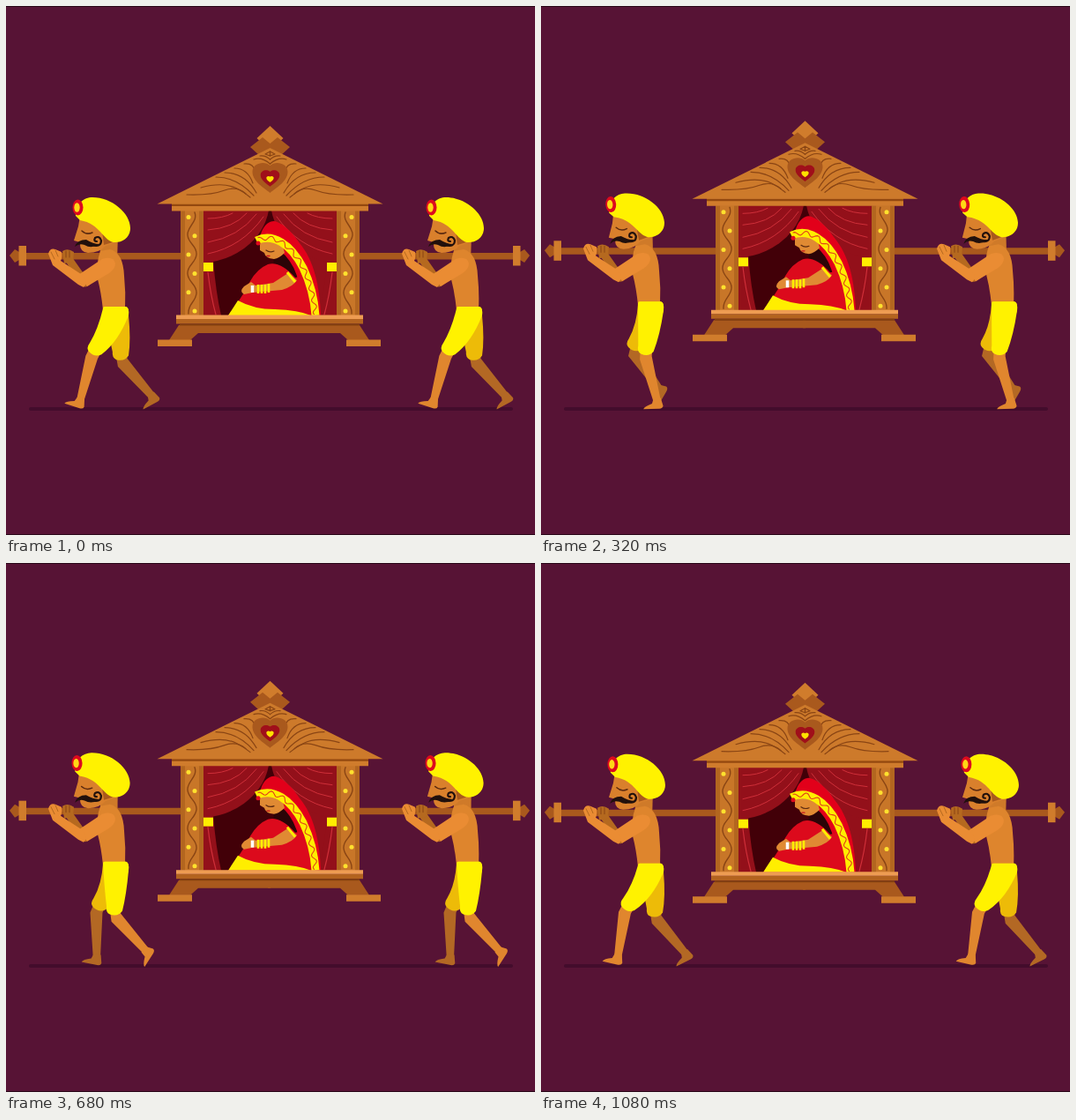
An HTML page for the animation above (1.12 s loop, 600 px wide and 600 px high).

```html
<!DOCTYPE html>
<html lang="en">
<head>
<meta charset="utf-8">
<title>Palanquin</title>
<style>
html, body { margin: 0; width: 100%; height: 100%; overflow: hidden; background: #571335; }
svg { display: block; width: 100vw; height: 100vh; }
.line { fill: none; stroke-linecap: round; stroke-linejoin: round; }
.flat { fill: none; stroke-linecap: butt; }
</style>
</head>
<body>
<svg id="stage" viewBox="0 0 600 600">
  <defs>
    <clipPath id="edge"><rect width="578" height="600"/></clipPath>

    <g id="carving" class="line" stroke="#8a4514" stroke-width="1.2">
      <path d="M205 214 Q232 215 248 209 Q262 204 272 213"/>
      <path d="M221 206 Q246 199 262 207 Q270 211 277 217"/>
      <path d="M238 194 Q262 194 281 215"/>
      <path d="M248 189 Q271 189 284 212"/>
      <path d="M259 184 Q274 184 280 201"/>
      <path d="M270 179 Q281 178 282 187"/>
      <path d="M281 174 Q290 171 299.5 179"/>
      <path d="M288 170 Q294 169 299.5 174"/>
      <path d="M294 168 L299.5 165 L299.5 170 Z"/>
    </g>

    <g id="pillar">
      <path d="M198 232 H224 V351 H198 Z" fill="#b3661f"/>
      <path d="M203 232 H219 V351 H203 Z" fill="#c87628"/>
      <path class="line" stroke="#8a4514" stroke-width="1.4"
        d="M214 234 C218 245 205 250 206 260 S217 272 216 282 S205 294 206 304 S217 316 216 326 S206 338 207 349"/>
    </g>

    <g id="curtain">
      <path d="M224 288 H235 Q238 325 244 351 H224 Z" fill="#93101a"/>
      <path class="line" stroke="#cf2f39" stroke-width="1.2" d="M229 302 Q232 328 238 350"/>
      <path d="M224 232 H298 Q293 258 270 275 Q249 290 224 291 Z" fill="#93101a"/>
      <g class="line" stroke="#cf2f39">
        <path d="M229 241 Q246 241 257 235"/>
        <path d="M229 254 Q258 252 273 235"/>
        <path d="M229 268 Q264 262 284 236"/>
        <path d="M229 281 Q268 273 292 239"/>
      </g>
      <path d="M224 291 H235 V301 H224 Z" fill="#ffee00"/>
    </g>

    <g id="foothold">
      <path d="M185 379 L196 362 H300 V371 H218 L209 379 Z" fill="#a9591d"/>
      <path d="M172 378.500 H211 V386 H172 Z" fill="#d07c2c"/>
    </g>

    <g id="poleEnd">
      <path d="M22 280 H199 V287.500 H22 Z" fill="#a9591d"/>
      <path d="M4 283 L10 276 L15 279 V288 L10 291 Z" fill="#a9591d"/>
      <path d="M14.500 272 H23 V294.500 H14.500 Z" fill="#d07c2c"/>
    </g>

    <path id="heart" d="M0 17 C-7 11 -20 4 -20 -7 C-20 -17 -6 -20 0 -14 C6 -20 20 -17 20 -7 C20 4 7 11 0 17 Z"/>

    <g id="head">
      <path d="M108 258 H127 L126 290 H106 Z" fill="#cf7a29"/>
      <path d="M84 238 L82 250 L77 266 L84 268 Q83 279 93 280 Q106 280 113 272 L125 268 L118 240 Z" fill="#d9802c"/>
      <path d="M109 255 Q116 262 121 268 L111 271 Z" fill="#a9591d"/>
      <path class="line" stroke="#5c2a10" stroke-width="1.500" d="M86 255 Q91 260 98 257"/>
      <path d="M78 273 Q81 265 91 265 Q99 270 106 270 Q97 276 89 271 Q83 269 78 273 Z" fill="#21100c"/>
      <path class="line" stroke="#21100c" stroke-width="2.200" d="M97 271 Q108 274 108 266 Q106 260 101 263 Q99 267 103 267"/>
      <path d="M79 238 C78 225 88 217 98 217 C120 217 141 235 141 252 C141 263 131 269 122 268 C109 265 107 247 84 243 Z" fill="#fff200"/>
      <ellipse cx="81.500" cy="228.500" rx="6" ry="9" fill="#dd0a1e"/>
      <ellipse cx="80.500" cy="228.500" rx="3.200" ry="5.200" fill="#ffd815"/>
    </g>

    <g id="farArm">
      <path class="line" stroke="#b5691f" stroke-width="9" d="M71 287 L90 314 L108 301"/>
      <path d="M64 278 Q70 274 77 279 L76 290 L66 292 Z" fill="#b5691f"/>
      <path class="line" stroke="#8a4514" d="M68 278 V285 M72 278 V285"/>
    </g>
    <path id="torso" d="M107 278 L118 276 Q133 280 134 306 Q136 325 135 345 H110 Q108 325 104 310 Q102 291 107 278 Z" fill="#de852d"/>
    <g id="nearArm">
      <path d="M109 287 Q122 283 124 292 Q124 298 117 303 L92 318 L82 305 Z" fill="#ea8c33"/>
      <path d="M48 281 Q50 274 56 276 L63 279 Q64 285 62 289 L85 304 Q95 312 88 319 L82 316 L53 294 Z" fill="#ea8c33"/>
      <path class="line" stroke="#b5691f" d="M51 279 L55 287 M56 277 L59 284"/>
    </g>
  </defs>

  <rect width="600" height="600" fill="#571335"/>
  <path d="M0 .5 H600 M0 599.500 H600" stroke="#2a0819"/>
  <path class="line" d="M28 457 H573" stroke="#430c2c" stroke-width="4"/>

  <g id="house">
    <use href="#poleEnd"/>
    <use href="#poleEnd" transform="matrix(-1 0 0 1 598 0)"/>
    <path d="M223 231 H376 V352 H223 Z" fill="#420008"/>
    <path d="M330 270 H376 V351 H345 Z" fill="#93101a"/>
    <use href="#curtain"/>
    <use href="#curtain" transform="matrix(-1 0 0 1 599 0)"/>

    <path d="M303 276 L328 284 L331 312 L304 298 Z" fill="#2c0407"/>
    <path d="M288 263 C290 251 297 244 304 244 C314 246 324 256 333 269 C349 288 356 318 357 351 H320 L332 314 Q324 276 286 265 Z" fill="#e2001a"/>
    <path d="M258 343 Q271 325 277 312 Q285 298 297 293 Q311 289 328 308 L346 305 V351 H252 Z" fill="#dc0a1c"/>
    <path d="M252 351 L263 334 Q281 344 305 344 Q332 345 346 351 Z" fill="#ffee00"/>
    <path d="M288 266 L304 264 Q315 271 316 280 Q310 286 304 287 Q294 286 293 280 L288 277 Z" fill="#e08a33"/>
    <path class="line" stroke="#5c2a10" stroke-width="1.200" d="M295 277 Q299 280 304 278"/>
    <path class="line" stroke="#c4141c" stroke-width="1.300" d="M296 283.500 H299"/>
    <path id="trim" class="flat" stroke="#ffee00" stroke-width="9" d="M284 266 C303 257 323 270 337 297 Q349 322 351 351"/>
    <path id="wave" class="line" stroke="#e2401a" stroke-width="1.100"/>
    <circle cx="286" cy="269" r="2.500" fill="#dd0a1e"/>
    <path d="M320 303 L330 311 Q326 318 313 322 L280 325 L270 327 Q264 324 270 318 L278 313 L283 317 L303 314 Z" fill="#e08a33"/>
    <path class="flat" stroke="#ffee00" stroke-width="3" d="M319 302 L328 313"/>
    <path class="flat" stroke="#ffee00" stroke-width="2.600" d="M286 316 V326 M290 316 V326 M294 316 V326 M298 315 V325"/>
    <path class="flat" stroke="#fff" stroke-width="3.500" d="M279.500 317 V325"/>

    <use href="#pillar"/>
    <use href="#pillar" transform="matrix(-1 0 0 1 599 0)"/>
    <g id="studs" fill="#ffe12e"></g>

    <path d="M188 224 H411 V232.500 H188 Z" fill="#d07c2c"/>
    <path d="M188 224.500 H411 V227 H188 Z" fill="#94490f"/>
    <path d="M299.500 136 L314.500 150 L299.500 164 L284.500 150 Z" fill="#d07c2c"/>
    <path d="M277 160 L291 149 L299.500 156 L308 149 L322 160 L311 170 H288 Z" fill="#a9591d"/>
    <path d="M171.500 224.500 L299.500 161 L427.500 224.500 Z" fill="#cd7a2b"/>
    <use href="#carving"/>
    <use href="#carving" transform="matrix(-1 0 0 1 599 0)"/>
    <use href="#heart" transform="translate(299.500 195)" fill="#a9591d"/>
    <use href="#heart" transform="translate(299.500 195.500) scale(.54)" fill="#a00f1a"/>
    <use href="#heart" transform="translate(299.500 196.500) scale(.21)" fill="#ffe000"/>

    <use href="#foothold"/>
    <use href="#foothold" transform="matrix(-1 0 0 1 597 0)"/>
    <path d="M193 355 H405 V360.500 H193 Z" fill="#b3631f"/>
    <path d="M197 360.500 H401 V362.500 H197 Z" fill="#84410f"/>
    <path d="M193 350.500 H405 V355 H193 Z" fill="#ee9c52"/>
  </g>
</svg>

<script>
const CYCLE = 1120, TICK = 40, STRIDE = CYCLE / 4;
const NS = "http://www.w3.org/2000/svg";
const stage = document.getElementById("stage");
const house = document.getElementById("house");

// [ankle x, ankle y, foot angle]: reach, passing, push-off, swing
const GAIT = {
  near: [[84, 448, 18], [130, 449, 0], [168, 443, -40], [145, 436, -85]],
  far: [[85, 447, 18], [131, 449, 0], [166, 443, -28], [137, 434, -64]]
};
const HIP = { near: [124, 348], far: [128, 348] };
const BONE = 54.25;

function add(parent, tag, attrs = {}) {
  const el = document.createElementNS(NS, tag);
  for (const key in attrs) el.setAttribute(key, attrs[key]);
  return parent.appendChild(el);
}

// Thigh and shin have equal length; the knee bends to the left.
function findKnee([hx, hy], [ax, ay]) {
  const dx = ax - hx, dy = ay - hy, d = Math.hypot(dx, dy);
  const bend = Math.sqrt(Math.max(0, BONE * BONE - d * d / 4));
  return [(hx + ax) / 2 - dy / d * bend, (hy + ay) / 2 + dx / d * bend];
}

const slope = (a, b) => Math.atan2(b[0] - a[0], b[1] - a[1]);

function at([x, y], angle, len, side) {
  const s = Math.sin(angle), c = Math.cos(angle);
  return `${(x + s * len + c * side).toFixed(2)} ${(y + c * len - s * side).toFixed(2)}`;
}

function makeLeg(parent, skin, cloth) {
  return {
    shin: add(parent, "path", { fill: skin }),
    foot: add(parent, "path", { fill: skin, d: "M-4 -4 L4 -4 L6.500 5 Q6 8 2 8 L-16 8 Q-15 5 -6 2 Z" }),
    cloth: add(parent, "path", { fill: cloth })
  };
}

function makeBearer(dx) {
  const clip = add(stage, "g", { "clip-path": "url(#edge)" });
  const root = add(clip, "g", { transform: `translate(${dx} 0)` });
  const arm = add(root, "use", { href: "#farArm" });
  const head = add(root, "use", { href: "#head" });
  const torso = add(root, "use", { href: "#torso" });
  const far = makeLeg(root, "#b36824", "#edbb08");
  const near = makeLeg(root, "#e0862e", "#fff200");
  const front = add(root, "use", { href: "#nearArm" });
  return { upper: [arm, torso, front], head, near, far };
}

function pose(keys, t) {
  const pos = (t % CYCLE) / STRIDE, i = Math.floor(pos);
  const k = (1 - Math.cos(Math.PI * (pos - i))) / 2;
  return keys[i].map((v, j) => v + (keys[(i + 1) % 4][j] - v) * k);
}

function drawLeg(leg, [hx, hy], [ax, ay, turn], bob) {
  const hip = [hx, hy + bob], ankle = [ax, ay], knee = findKnee(hip, ankle);
  const thigh = slope(hip, knee), shin = slope(knee, ankle), y = 341 + bob;
  leg.shin.setAttribute("d", `M${at(hip, thigh, 36, -7)} L${at(hip, thigh, 36, 7)}
    L${at(knee, shin, 3, 7)} L${at(ankle, shin, 2, 4)} L${at(ankle, shin, 2, -4)}
    L${at(knee, shin, 3, -7)} Z`);
  leg.foot.setAttribute("transform", `translate(${ankle}) rotate(${turn})`);
  leg.cloth.setAttribute("d", `M112 ${y} H136 Q140 ${y + 1} 139 ${y + 10}
    Q${at(hip, thigh * .6, 30, 13)} ${at(hip, thigh, 49, 9)}
    Q${at(hip, thigh, 56, 4)} ${at(hip, thigh, 53, -5)}
    Q${at(hip, thigh, 51, -10)} ${at(hip, thigh, 44, -9)}
    Q${at(hip, thigh * .7, 24, -12)} 110 ${y + 2} Q110 ${y} 112 ${y} Z`);
}

function drawTrim() {
  const trim = document.getElementById("trim"), end = trim.getTotalLength();
  const points = [];
  for (let s = 3; s < end - 1; s += 1.5) {
    const a = trim.getPointAtLength(s), b = trim.getPointAtLength(s + 1);
    const off = 2.4 * Math.sin(s / 2.2);
    points.push(`${a.x + (b.y - a.y) * off} ${a.y - (b.x - a.x) * off}`);
  }
  document.getElementById("wave").setAttribute("d", "M" + points.join("L"));
}

const studs = document.getElementById("studs");
for (let i = 0; i < 6; i++) {
  const x = i % 2 ? 214 : 207, cy = 239.500 + i * 21.300;
  for (const cx of [x, 599 - x]) add(studs, "circle", { cx, cy, r: 2.5 });
}

drawTrim();
const bearers = [makeBearer(0), makeBearer(401)];

function draw(now) {
  const t = Math.floor((now % CYCLE) / TICK) * TICK;
  const lift = (1 - Math.cos(2 * Math.PI * t / (CYCLE / 2))) / 2;
  const bob = -6 * lift, shift = `translate(0 ${bob})`;
  house.setAttribute("transform", shift);
  for (const b of bearers) {
    b.upper.forEach(el => el.setAttribute("transform", shift));
    b.head.setAttribute("transform", `${shift} rotate(${-3.4 * lift} 120 270)`);
    drawLeg(b.near, HIP.near, pose(GAIT.near, t), bob);
    drawLeg(b.far, HIP.far, pose(GAIT.far, t + CYCLE / 2), bob);
  }
}

function loop() {
  draw(performance.now());
  requestAnimationFrame(loop);
}
loop();
</script>
</body>
</html>
```
